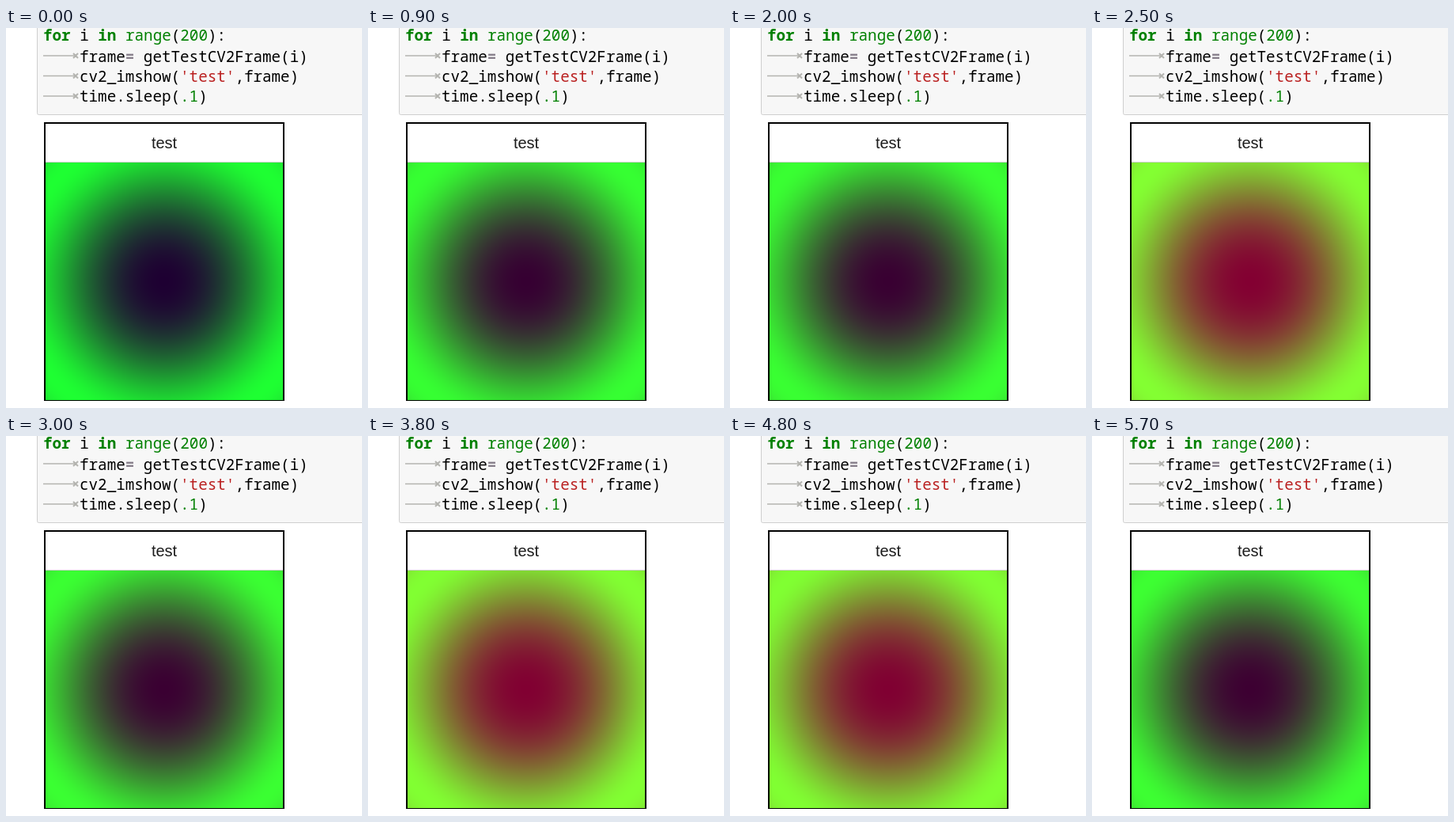
These frames come from a looping animation (450 by 480 pixels, 6.2 s). An HTML page with a canvas:

```html
<!DOCTYPE html>
<html lang="en">
<head>
<meta charset="utf-8">
<title>test</title>
<style>
  html, body { margin: 0; width: 100%; height: 100%; overflow: hidden; background: #fff; }
  svg, canvas { position: absolute; display: block; }
  svg { left: 0; top: 0; }
  canvas { left: 50px; top: 170px; }
  .code { font: 19.25px "Noto Sans Mono", "DejaVu Sans Mono", monospace; fill: #000; }
  .key { fill: #008000; font-weight: bold; }
  .num { fill: #008000; }
  .str { fill: #ba2121; }
  .op { fill: #88808c; font-weight: bold; }
  .title { font: 20px "Liberation Sans", Arial, sans-serif; fill: #1c1c1c; text-anchor: middle; }
</style>
</head>
<body>
<svg width="450" height="480" viewBox="0 0 450 480">
  <defs>
    <g id="tab" fill="none" stroke="#b4b4b0">
      <path d="M47 0H87" stroke-width="1.6"/>
      <path d="M85 -3L88 0L85 3M91 -3L88 0L91 3" stroke-width="2"/>
    </g>
  </defs>
  <rect x="39.5" y="-10" width="430" height="119.5" rx="2" fill="#f7f7f7" stroke="#cfcfcf"/>
  <use href="#tab" y="35"/>
  <use href="#tab" y="60.5"/>
  <use href="#tab" y="86"/>
  <g class="code">
    <text x="47" y="16"><tspan class="key">for</tspan> i <tspan class="key">in</tspan> <tspan class="num">range</tspan>(<tspan class="num">200</tspan>):</text>
    <text x="93" y="43">frame<tspan class="op">=</tspan> getTestCV2Frame(i)</text>
    <text x="93" y="68">cv2_imshow(<tspan class="str">'test'</tspan>,frame)</text>
    <text x="93" y="93">time.sleep(<tspan class="num">.1</tspan>)</text>
  </g>
  <rect x="49" y="120" width="302" height="350" fill="#fff" stroke="#000" stroke-width="2"/>
  <path d="M50 169.5H350" stroke="#c8ccc8"/>
  <text class="title" x="200" y="152">test</text>
</svg>
<canvas width="300" height="300"></canvas>
<script>
  const LOOP = 6200, TICK = 100, SIZE = 300;
  // Ticks on which the picture does not advance
  const HELD = [3, 6, 10, 12, 33, 35, 37, 53, 54, 55, 56, 58, 59, 60, 61];

  const ctx = document.querySelector('canvas').getContext('2d');
  const image = ctx.createImageData(SIZE, SIZE);
  const px = image.data;

  // Green follows sin(x² + y²) on a -1..1 grid; blue is constant
  const grid = i => 2 * i / (SIZE - 1) - 1;
  for (let y = 0, p = 0; y < SIZE; y++) {
    for (let x = 0; x < SIZE; x++, p += 4) {
      px[p + 1] = 255 * Math.sin(grid(x) ** 2 + grid(y) ** 2);
      px[p + 2] = 50;
      px[p + 3] = 255;
    }
  }

  const stepAt = tick => tick - HELD.filter(h => h <= tick).length;
  const redAt = step => Math.round(94 - 67 * Math.cos(1.8825 * step - 12.25));

  let shown = -1;
  function draw(step) {
    if (step === shown) return;
    shown = step;
    const red = redAt(step);
    for (let p = 0; p < px.length; p += 4) px[p] = red;
    ctx.putImageData(image, 0, 0);
  }

  const start = performance.now();
  function play() {
    const time = (performance.now() - start) % LOOP;
    draw(stepAt(Math.floor(time / TICK)));
    requestAnimationFrame(play);
  }
  play();
</script>
</body>
</html>
```
